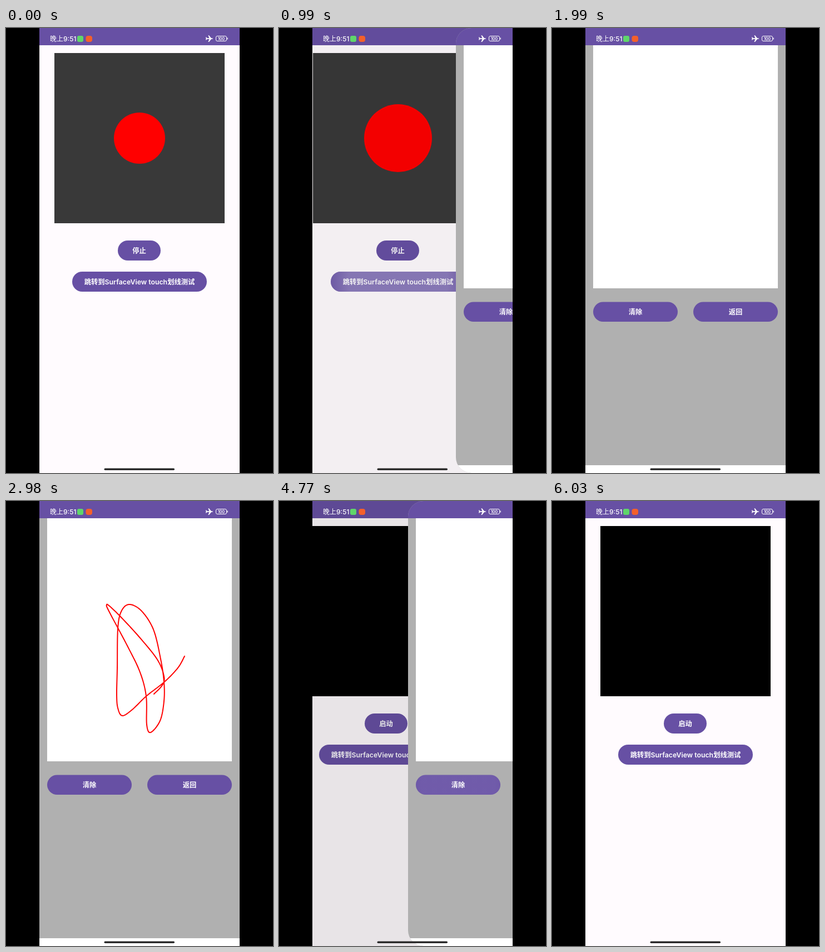
An HTML page with a canvas that plays this animation: 480 px wide and 800 px high, repeating every 6.29 s.

```html
<!DOCTYPE html>
<html lang="zh-CN">
<head>
<meta charset="utf-8">
<style>
  html, body { margin: 0; width: 100%; height: 100%; overflow: hidden; background: #000; }
  canvas { display: block; }
</style>
</head>
<body>
<canvas width="480" height="800"></canvas>
<script>
const ctx = document.querySelector('canvas').getContext('2d');
const LOOP = 6290, LEFT = 60, WIDTH = 360;
const PURPLE = '#6750a4', HOME_BG = '#fffbfe', WHITE = '#fff', GRAY = '#b0b0b0';
const FONT = 'Inter, "Noto Sans CJK SC", "Noto Sans CJK", sans-serif';
const OPEN_AT = 900, CLOSE_AT = 4618, CLEAR_AT = 4240;
const plane = new Path2D('M359 16.6h1.2l1.3 1.6h4.1l-2.2-5h1.6l4 5h1.6q1.4.2 1.4.9t-1.4.9H369l-4 5h-1.6l2.2-5h-4.1l-1.3 1.6H359l.7-2.5z');

const clamp = v => Math.min(1, Math.max(0, v));

// Critically damped spring: 1 at the start, settling at 0.
function spring(ms, speed) {
  const s = Math.max(0, ms) / 1000 * speed;
  const rest = (1 + s) * Math.exp(-s);
  return rest < 0.003 ? 0 : rest;
}

function rect(x, y, w, h, color) {
  ctx.fillStyle = color;
  ctx.fillRect(x, y, w, h);
}

function roundRect(x, y, w, h, r, color) {
  ctx.beginPath();
  ctx.roundRect(x, y, w, h, r);
  if (!color) return;
  ctx.fillStyle = color;
  ctx.fill();
}

function circle(x, y, r, color) {
  ctx.fillStyle = color;
  ctx.beginPath();
  ctx.arc(x, y, r, 0, Math.PI * 2);
  ctx.fill();
}

function text(str, x, y, size, weight) {
  ctx.font = `${weight} ${size}px ${FONT}`;
  ctx.textAlign = 'center';
  ctx.fillStyle = WHITE;
  ctx.fillText(str, x, y);
}

// age is the time since the press; the ripple spreads, then fades.
function button(label, x, y, w, h, age = -1) {
  const cx = x + w / 2, cy = y + h / 2;
  ctx.save();
  roundRect(x, y, w, h, h / 2, PURPLE);
  if (age > 0 && age < 620) {
    const r = 10 + w * 0.6 * clamp(age / 230);
    const glow = ctx.createRadialGradient(cx, cy, 0, cx, cy, r);
    glow.addColorStop(0, '#8c7cbc');
    glow.addColorStop(0.65, '#8c7cbc');
    glow.addColorStop(1, '#8c7cbc00');
    ctx.clip();
    ctx.globalAlpha = clamp((620 - age) / 350);
    rect(x, y, w, h, glow);
  }
  ctx.restore();
  text(label, cx, cy + 4.6, 12.3, 600);
}

// Catmull-Rom curve through the points.
function smooth(points) {
  const out = [], steps = 10, at = i => points[Math.min(points.length - 1, Math.max(0, i))];
  for (let i = 0; i < points.length - 1; i++) {
    for (let k = 0; k < steps; k++) {
      const u = k / steps;
      out.push([0, 1].map(d => {
        const [a, b, c, e] = [-1, 0, 1, 2].map(j => at(i + j)[d]);
        return b + u / 2 * (c - a + u * (2 * a - 5 * b + 4 * c - e + u * (3 * (b - c) + e - a)));
      }));
    }
  }
  return [...out, points.at(-1)];
}

const stroke = smooth([
  [321, 279], [309, 300], [285, 325], [252, 351], [227, 375], [209, 386], [201, 372], [199, 348],
  [200, 300], [201, 230], [207, 199], [221, 186], [243, 197], [265, 231], [278, 284], [284, 325],
  [284, 360], [277, 395], [260, 416], [253, 402], [252, 351], [241, 308], [219, 262], [185, 198],
  [181, 187], [185, 188], [205, 207], [240, 245], [272, 285], [284, 315], [281, 331], [266, 347]
]);

function homePage(t, covered) {
  const running = t < CLOSE_AT;
  ctx.save();
  ctx.translate(-Math.round(covered * WIDTH / 4), 0);
  rect(LEFT, 0, WIDTH + 100, 800, HOME_BG);
  rect(LEFT, 0, WIDTH + 100, 31, PURPLE);
  rect(87, 45, 306, 306, running ? '#393939' : '#000');
  if (running) circle(240, 198, 46 + 15 * t / 990, '#f00');
  button(running ? '停止' : '启动', 201, 382, 77, 36);
  button('跳转到SurfaceView touch划线测试', 119, 438, 242, 36, running ? t - 790 : -1);
  ctx.restore();
  rect(LEFT, 0, WIDTH, 800, `rgba(0, 0, 0, ${covered * 0.17})`);
}

function drawPage(t, x) {
  ctx.save();
  ctx.translate(x, 0);
  roundRect(LEFT, 0, WIDTH, 800, x > 0 ? 28 : 0);
  ctx.clip();
  rect(LEFT, 0, WIDTH, 800, GRAY);
  rect(LEFT, 0, WIDTH, 31, PURPLE);
  rect(74, 31, 332, 437, WHITE);
  rect(LEFT, 786, WIDTH, 14, WHITE);
  button('清除', 74, 492.5, 152, 35.5, t - CLEAR_AT);
  button('返回', 254, 492.5, 152, 35.5, t - 4530);
  const drawn = t < CLEAR_AT ? clamp((t - 2040) / 940) * stroke.length : 0;
  if (drawn > 1) {
    ctx.beginPath();
    stroke.slice(0, drawn).forEach(p => ctx.lineTo(...p));
    ctx.strokeStyle = '#f00';
    ctx.lineWidth = 2;
    ctx.lineJoin = ctx.lineCap = 'round';
    ctx.stroke();
  }
  ctx.restore();
}

function systemBars() {
  text('晚上9:51', 102.7, 23.6, 12, 500);
  roundRect(128, 14, 11, 11, 3, '#5fd66a');
  roundRect(143.5, 14, 11.5, 11, 4, '#f5602a');
  ctx.fillStyle = ctx.strokeStyle = WHITE;
  ctx.fill(plane);
  ctx.lineWidth = 1;
  roundRect(377.5, 14.5, 19, 9, 2.5);
  ctx.stroke();
  rect(397.5, 17.5, 1.3, 3, WHITE);
  text('100', 387, 21.7, 7, 600);
  roundRect(176.5, 791.5, 126.5, 3.5, 1.75, '#2c2c2c');
}

const start = performance.now();

function frame() {
  const t = (performance.now() - start) % LOOP;
  const covered = t < CLOSE_AT
    ? 1 - spring(t - OPEN_AT, 11.6)
    : spring(t - CLOSE_AT, 10.5);
  rect(0, 0, 480, 800, '#000');
  ctx.save();
  ctx.beginPath();
  ctx.rect(LEFT, 0, WIDTH, 800);
  ctx.clip();
  if (covered < 1) homePage(t, covered);
  if (covered > 0) drawPage(t, Math.round(WIDTH * (1 - covered)));
  systemBars();
  ctx.restore();
  requestAnimationFrame(frame);
}
frame();
</script>
</body>
</html>
```
